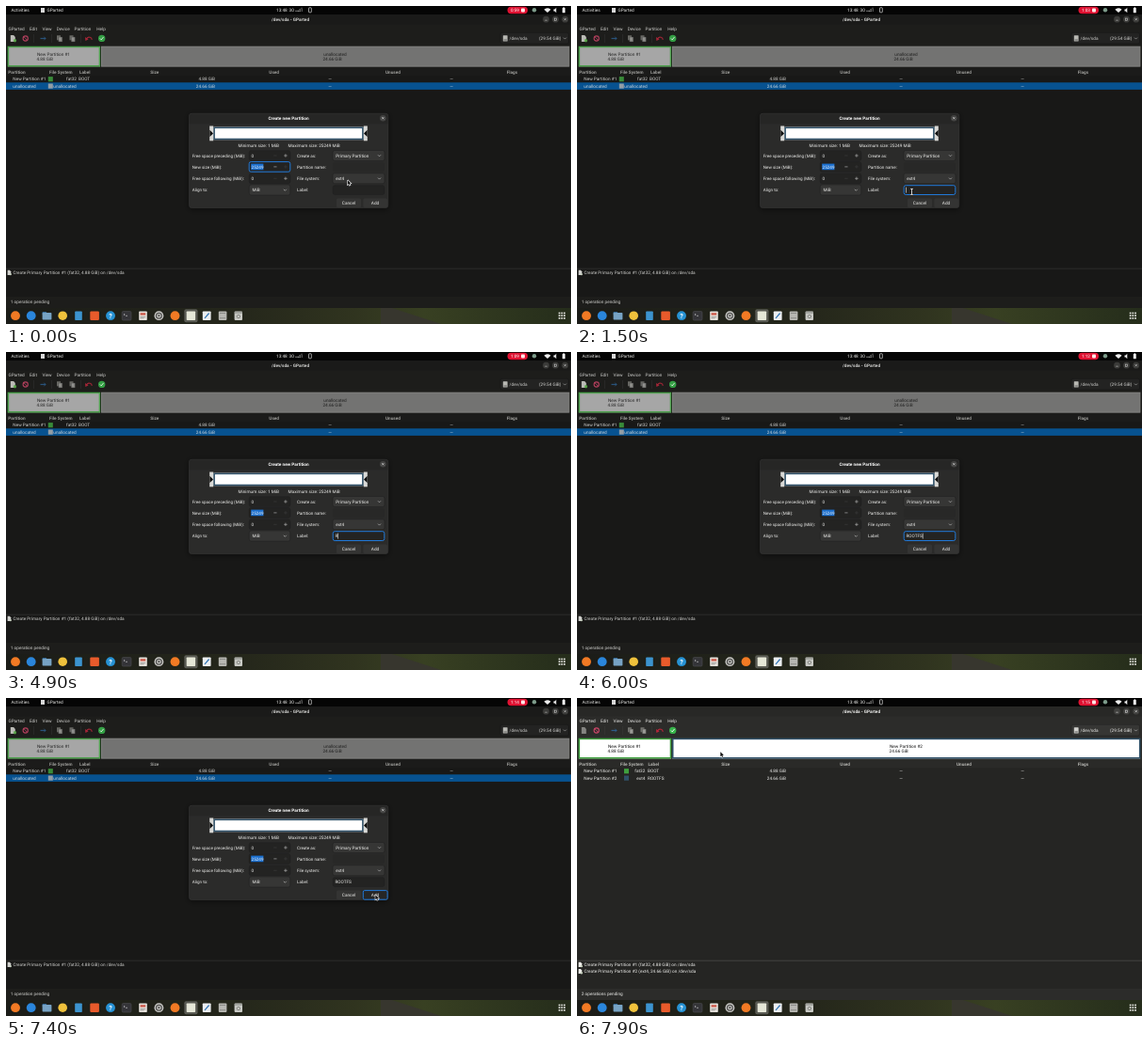
An HTML page with a canvas for the animation above (8 s loop, 600 px wide and 338 px high).

```html
<!DOCTYPE html>
<html lang="en">
<head>
<meta charset="utf-8">
<title>Partition editor</title>
<style>
html, body { margin: 0; width: 100%; height: 100%; overflow: hidden; background: #000; }
canvas { display: block; width: 600px; height: 338px; }
</style>
</head>
<body>
<canvas id="stage"></canvas>
<script>
const LOOP = 8000, W = 600, H = 338;
const stage = document.getElementById('stage');
const dpr = window.devicePixelRatio || 1;
stage.width = W * dpr;
stage.height = H * dpr;
const c = stage.getContext('2d');
const BLUE = '#2179d8', GREEN = '#3fa03f', EXT = '#2f5068', INK = '#f0f0ee';

function rect(x, y, w, h, color) {
  c.fillStyle = color;
  c.fillRect(x, y, w, h);
}
function round(x, y, w, h, r, fill, line, lw = 1) {
  c.beginPath();
  c.roundRect(x, y, w, h, r);
  if (fill) { c.fillStyle = fill; c.fill(); }
  if (line) { c.strokeStyle = line; c.lineWidth = lw; c.stroke(); }
}
function frame(x, y, w, h, color, lw) {
  c.strokeStyle = color;
  c.lineWidth = lw;
  c.strokeRect(x + lw / 2, y + lw / 2, w - lw, h - lw);
}
function disc(x, y, r, fill) {
  c.beginPath();
  c.arc(x, y, r, 0, Math.PI * 2);
  c.fillStyle = fill;
  c.fill();
}
function ring(x, y, r, color, lw) {
  c.beginPath();
  c.arc(x, y, r, 0, Math.PI * 2);
  c.strokeStyle = color;
  c.lineWidth = lw;
  c.stroke();
}
function line(pts, color, lw = 0.8) {
  c.beginPath();
  for (let i = 0; i < pts.length; i += 2) c.lineTo(pts[i], pts[i + 1]);
  c.strokeStyle = color;
  c.lineWidth = lw;
  c.stroke();
}
function poly(pts, color) {
  c.beginPath();
  for (let i = 0; i < pts.length; i += 2) c.lineTo(pts[i], pts[i + 1]);
  c.closePath();
  c.fillStyle = color;
  c.fill();
}
// y is the vertical middle of the letters
function text(s, x, y, { color = INK, align = 'left', bold = false, size = 4.7 } = {}) {
  c.font = `${bold ? 700 : 400} ${size}px Roboto, "DejaVu Sans", sans-serif`;
  c.textRendering = 'geometricPrecision';
  c.textAlign = align;
  c.textBaseline = 'alphabetic';
  c.fillStyle = color;
  c.fillText(s, x, y + size * 0.36);
}
function chevron(x, y) {
  line([x - 1.5, y - 0.7, x, y + 0.8, x + 1.5, y - 0.7], '#bbb', 0.7);
}
function cross(x, y) {
  line([x - 1.1, y - 1.1, x + 1.1, y + 1.1], '#eee', 0.6);
  line([x - 1.1, y + 1.1, x + 1.1, y - 1.1], '#eee', 0.6);
}
function sheet(x, y, w, h, color) {
  poly([x, y, x + w * 0.65, y, x + w, y + h * 0.3, x + w, y + h, x, y + h], color);
}

function topBar(t) {
  rect(0, 0, W, 9, '#050505');
  text('Activities', 5.5, 4.5);
  rect(37, 2, 4, 5, '#d8d8d8');
  text('GParted', 43.5, 4.5);
  text('13:48', 287, 4.5);
  text('30', 300.5, 4.5);
  text('أكت', 307, 4.5, { size: 4.4 });
  round(321.5, 1.8, 2.8, 5, 0.6, null, '#ddd', 0.7);
  round(532.5, 0.8, 21.5, 7.4, 3.7, '#e01232');
  const sec = t < 100 ? 59 : 60 + Math.floor(t / 500);
  const clock = Math.floor(sec / 60) + ':' + String(sec % 60).padStart(2, '0');
  text(clock, 536, 4.5, { color: '#fff', size: 4.6 });
  round(547, 2.4, 4, 4, 0.8, '#ffe6e6');
  disc(561, 4.3, 2.2, '#7d9c8b');
  c.beginPath();
  c.moveTo(575, 7);
  c.arc(575, 7, 4.8, -Math.PI * 0.77, -Math.PI * 0.23);
  c.fillStyle = '#eee';
  c.fill();
  poly([581.5, 3.4, 582.7, 3.4, 584.3, 1.8, 584.3, 7.2, 582.7, 5.6, 581.5, 5.6], '#eee');
  round(590.8, 2, 3, 5.3, 0.5, '#eee');
  rect(591.7, 1.2, 1.2, 1, '#eee');
}

function toolbar(done) {
  const dim = '#777773';
  sheet(4.8, 31, 5, 7, done ? '#858582' : '#d6d6d2');
  if (!done) disc(9.5, 36.7, 1.7, '#55a843');
  ring(20.7, 34.5, 2.6, '#cb4668', 1.1);
  line([18.9, 32.7, 22.5, 36.3], '#cb4668', 0.9);
  line([36.5, 34.5, 42, 34.5], '#2d5d8b', 1.2);
  line([40.3, 32.7, 42.1, 34.5, 40.3, 36.3], '#2d5d8b', 0.9);
  for (const x of [54, 67.5]) {
    rect(x, 31.3, 4, 5, dim);
    round(x + 1.8, 33, 4, 5, 0.3, '#9a9a96', '#3a3a38', 0.5);
  }
  for (const x of [29.5, 48.5, 79.5]) rect(x, 30, 0.5, 9, '#3a3a38');
  c.beginPath();
  c.arc(88.3, 36.2, 3, -Math.PI * 0.9, -0.1);
  c.strokeStyle = '#b5263a';
  c.lineWidth = 1.1;
  c.stroke();
  poly([84, 33, 84.3, 37, 87.6, 35.5], '#b5263a');
  disc(101.7, 34.4, 3.7, '#37b34a');
  line([99.9, 34.5, 101.2, 35.9, 103.6, 32.9], '#fff', 0.9);
  round(527.8, 31.2, 4.8, 6.4, 0.6, '#d0d0cc');
  rect(528.6, 35.5, 3.2, 1, '#555');
  text('/dev/sda', 534.6, 34.4);
  text('(29.54 GiB)', 566, 34.4);
  chevron(593.5, 34.3);
}

// flat areas, which darken while the dialog is open
function surfaces(done, shade) {
  rect(0, 9, W, 312, '#2c2c2a');
  rect(0, 9, W, 10.5, '#282826');
  round(525, 28.3, 72.5, 11.7, 2, '#363634', '#1f1f1e', 0.5);
  rect(2, 43, 98, 21.4, '#fff');
  rect(101, 43, 497, 21.4, done ? '#fff' : '#b0b0ae');
  rect(0, 66, W, 213, '#252523');
  rect(0, 66, W, 8.2, '#2a2a28');
  if (!done) rect(0, 81.3, W, 7.6, '#0a7edc');
  rect(0, 278.5, W, 1.5, '#393937');
  rect(0, 280, W, 29, '#252523');
  if (shade > 0) rect(0, 9, W, 312, `rgba(0,0,0,${shade})`);
}

function diskBar(done) {
  frame(1.6, 42.7, 98.6, 21.8, GREEN, 1.5);
  frame(101, 42.7, 497.4, 21.8, done ? EXT : '#898987', done ? 1.5 : 0.8);
  const mid = { color: '#111', align: 'center' };
  text('New Partition #1', 50.5, 51, mid);
  text('4.88 GiB', 41.2, 56.4, mid);
  text(done ? 'New Partition #2' : 'unallocated', 349.5, 51, mid);
  text('24.66 GiB', done ? 341.7 : 346.5, 56.4, mid);
}

function row(y, name, color, fs, label, size, done) {
  text(name, 7.3, y);
  rect(done ? 50 : 44.8, y - 2.6, 5, 5.2, color);
  if (fs === 'unallocated') text(fs, 50.3, y);
  else text(fs, done ? 72.3 : 75, y, { align: 'right' });
  text(label, done ? 75 : 77, y);
  text(size, 222, y, { align: 'right' });
  text('—', 344, y, { align: 'center' });
  text('—', 473, y, { align: 'center' });
}

function operation(y, n, fs, size) {
  sheet(1.6, y - 2.7, 3.6, 5.2, '#f0f0ec');
  disc(4.8, y + 1.6, 1.2, '#c5cfbd');
  text(`Create Primary Partition #${n} (${fs}, ${size} GiB) on /dev/sda`, 7.5, y);
}

function mainWindow(done, shade) {
  surfaces(done, shade);
  c.globalAlpha = 1 - shade * 0.4;
  text('/dev/sda - GParted', 302, 14.3, { bold: true, align: 'center' });
  for (const x of [573.5, 583.5, 593.7]) disc(x, 14.2, 3.4, '#41413f');
  line([572.3, 15.2, 574.7, 15.2], '#ddd', 0.6);
  frame(582.1, 12.8, 2.8, 2.8, '#ddd', 0.6);
  cross(593.7, 14.2);
  const menu = { GParted: 2.5, Edit: 25, View: 38.5, Device: 53.8, Partition: 72.5, Help: 96.2 };
  for (const s in menu) text(s, menu[s], 24);
  toolbar(done);
  diskBar(done);

  const heads = { Partition: 2.3, 'File System': 46, Label: done ? 75.5 : 78, Size: 153.3, Used: 279.3, Unused: 403, Flags: 531.7 };
  for (const s in heads) text(s, heads[s], 70.2, { bold: true, color: '#b5b5b1' });
  row(77.7, 'New Partition #1', GREEN, 'fat32', 'BOOT', '4.88 GiB', done);
  if (done) row(85.1, 'New Partition #2', EXT, 'ext4', 'ROOTFS', '24.66 GiB', done);
  else row(85.1, 'unallocated', '#a9a9a9', 'unallocated', '', '24.66 GiB', done);

  operation(283.5, 1, 'fat32', '4.88');
  if (done) operation(290.6, 2, 'ext4', '24.66');
  text(done ? '2 operations pending' : '1 operation pending', 4.8, 314.8);
  c.globalAlpha = 1;
}

function dock() {
  const g = c.createLinearGradient(0, 0, W, 0);
  g.addColorStop(0, '#1b1c18');
  g.addColorStop(0.42, '#25271b');
  g.addColorStop(0.62, '#30341f');
  g.addColorStop(0.74, '#384022');
  g.addColorStop(1, '#252d1b');
  rect(0, 321, W, 17, g);
  poly([398, 321, 410, 321, 462, 338, 398, 338], '#37362e');
  const y = 329.2;
  disc(10, y, 4.9, '#f27a24');
  disc(26.7, y, 4.9, '#2a86dc');
  round(38.6, 325, 4.5, 3, 0.7, '#3a6e9d');
  round(38.6, 326, 9.8, 7.5, 0.8, '#77a3c4');
  disc(60.2, y, 4.8, '#f0c23c');
  round(73.2, 324.4, 7.6, 9.6, 0.8, '#3c94cf');
  round(89.3, 324.5, 9.6, 9.4, 1.2, '#e95b2b');
  disc(111, y, 4.9, '#2793d5');
  text('?', 111, y, { align: 'center', bold: true, size: 7, color: '#fff' });
  round(123.2, 324.6, 9.8, 9.4, 1.2, '#343438', '#55555a', 0.5);
  line([125, 327, 126.2, 328, 125, 329], '#ddd', 0.6);
  line([127, 329.3, 129, 329.3], '#ddd', 0.6);
  round(141.2, 324.4, 8.6, 9.6, 0.8, '#e6e2dc');
  rect(142.6, 326.2, 5.6, 2.4, '#cd5b4b');
  rect(142.6, 330, 5.6, 0.7, '#888');
  rect(142.6, 331.6, 4, 0.7, '#888');
  disc(162.4, y, 4.9, '#c9c9c5');
  ring(162.4, y, 2.9, '#50504e', 1.2);
  disc(162.4, y, 1.1, '#50504e');
  disc(179.5, y, 4.9, '#f27a24');
  round(189.3, 322.2, 14.2, 14, 2, 'rgba(255,255,255,.25)');
  round(191.7, 324.4, 9.4, 9.6, 0.8, '#e5e7d7');
  round(208.8, 324.4, 8.8, 9.6, 0.8, '#eceff1');
  line([211, 331.8, 215.6, 326.5], '#3376b5', 1.2);
  round(225.8, 324.4, 8.6, 9.6, 1, '#b7b7b2');
  rect(227, 326, 6, 1, '#8d8d89');
  rect(227, 331.2, 6, 1, '#8d8d89');
  round(242.6, 324.4, 8.4, 9.6, 1, '#c9cac5');
  rect(242.6, 325.6, 8.4, 0.8, '#6f706c');
  ring(246.8, 330, 1.7, '#73746f', 0.8);
  for (let i = 0; i < 9; i++) rect(586.8 + (i % 3) * 2.7, 325.6 + Math.floor(i / 3) * 2.7, 1.7, 1.7, '#e8e8e4');
}

function combo(x, y, w, s) {
  round(x, y, w, 11, 2, '#363635', '#1f1f1e', 0.5);
  text(s, x + 3.2, y + 5.5);
  chevron(x + w - 5.5, y + 5.5);
}
function spin(y, value, { selected, focus, minus, plus }) {
  round(258.2, y, 43.6, 10.6, 2, '#232322', focus ? BLUE : '#1f1f1e', focus ? 1 : 0.5);
  if (selected) rect(260.2, y + 2, 13.2, 6.6, '#1a6fd0');
  text(value, 260.6, y + 5.3, { size: 4.6 });
  line([284.3, y + 5.3, 287.5, y + 5.3], minus ? '#aaa' : '#3c3c3b', 0.7);
  const k = plus ? '#aaa' : '#3c3c3b';
  line([295.2, y + 5.3, 298.6, y + 5.3], k, 0.7);
  line([296.9, y + 3.6, 296.9, y + 7], k, 0.7);
}

const typing = [[3500, 'R'], [5200, 'RO'], [5500, 'ROO'], [5700, 'ROOT'], [5900, 'ROOTF'], [6000, 'ROOTFS']];
const blinks = [2100, 2700, 3300, 4200, 5000, 6800];

function dialog(t) {
  const inLabel = t >= 1250 && t < 7300, onAdd = t >= 7300;
  c.save();
  c.shadowColor = 'rgba(0,0,0,.5)';
  c.shadowBlur = 6 * dpr;
  c.shadowOffsetY = 1.5 * dpr;
  round(194.3, 114, 211.7, 100.8, 3, '#2b2b2a');
  c.restore();
  round(194.5, 114.2, 211.3, 100.4, 3, null, '#393938', 0.5);
  round(194.8, 114.4, 210.7, 10.8, [3, 3, 0, 0], '#262625');
  text('Create new Partition', 300, 119.5, { bold: true, align: 'center', color: '#fff' });
  disc(400.3, 119.2, 3.3, '#444443');
  cross(400.3, 119.2);

  rect(216.2, 127.5, 4, 15.8, '#d9d9d6');
  rect(379.8, 127.5, 4, 15.8, '#d9d9d6');
  poly([216.4, 131.8, 220, 135.4, 216.4, 139], '#0a0a0a');
  poly([383.6, 131.8, 380, 135.4, 383.6, 139], '#0a0a0a');
  rect(220.4, 128.6, 159.2, 13.6, '#fff');
  frame(220.4, 128.6, 159.2, 13.6, EXT, 1.5);
  text('Minimum size: 1 MiB', 246.5, 148);
  text('Maximum size: 25249 MiB', 299.5, 148);

  const o = { size: 4.55 };
  text('Free space preceding (MiB):', 197.8, 159, o);
  text('New size (MiB):', 197.8, 171, o);
  text('Free space following (MiB):', 197.8, 183.3, o);
  text('Align to:', 197.8, 195.4, o);
  text('Create as:', 309, 159, o);
  text('Partition name:', 309, 171, o);
  text('File system:', 309, 183.3, o);
  text('Label:', 309, 195.4, o);
  spin(153.7, '0', { plus: true });
  spin(165.6, '25249', { selected: true, focus: !inLabel && !onAdd, minus: true });
  spin(178, '0', { plus: true });
  combo(258.2, 190, 43.6, 'MiB');
  combo(347, 153.5, 55, 'Primary Partition');
  round(347.2, 165.8, 54.6, 10.4, 2, '#282827');
  combo(347, 177.8, 55, 'ext4');

  round(347.2, 190.7, 54.6, 9.8, 2, '#232322', inLabel ? BLUE : '#1f1f1e', inLabel ? 1 : 0.5);
  let label = '';
  for (const [at, s] of typing) if (t >= at) label = s;
  text(label, 349.4, 195.6);
  if (inLabel && !blinks.some(b => t >= b && t < b + 200)) {
    rect(349.4 + c.measureText(label).width, 192.6, 0.6, 6, '#f4f4f4');
  }

  round(351, 204.6, 26, 9.6, 1.5, '#343433');
  round(379.3, 204.6, 25.8, 9.6, 1.5, onAdd ? '#262625' : '#343433', onAdd ? BLUE : null);
  text('Cancel', 364, 209.2, { align: 'center' });
  text('Add', 392, 209.2, { align: 'center' });
}

// time, x, y of the pointer tip
const path = [[0, 362.8, 185], [400, 362.8, 185], [1200, 355.5, 197.4], [6400, 355.5, 197.4],
  [6800, 392.3, 209.2], [7450, 392.3, 209.2], [7900, 152.3, 57.2], [8000, 152.3, 57.2]];

function pointer(t) {
  if (t >= 3500 && t < 6400) return;
  const i = path.findIndex(p => t < p[0]);
  const [t0, x0, y0] = path[i - 1], [t1, x1, y1] = path[i];
  const u = (t - t0) / (t1 - t0), e = u * u * (3 - 2 * u);
  const x = x0 + (x1 - x0) * e, y = y0 + (y1 - y0) * e;
  if (t < 7450 && x > 347 && x < 402 && y > 190.5 && y < 200.6) {
    for (const [color, w] of [['#111', 1.8], ['#fff', 0.8]]) {
      line([x - 1.4, y - 3, x + 1.4, y - 3], color, w);
      line([x, y - 3, x, y + 3], color, w);
      line([x - 1.4, y + 3, x + 1.4, y + 3], color, w);
    }
    return;
  }
  c.save();
  c.translate(x, y);
  const arrow = [0, 0, 0, 5, 1.1, 4, 1.9, 5.8, 2.8, 5.4, 2, 3.7, 3.5, 3.6];
  line([...arrow, 0, 0], '#fff', 1.1);
  poly(arrow, '#111');
  c.restore();
}

function draw(t) {
  c.setTransform(dpr, 0, 0, dpr, 0, 0);
  const done = t >= 7500;
  const shade = 0.35 * Math.max(0, Math.min(1, (7700 - t) / 200));
  topBar(t);
  mainWindow(done, shade);
  dock();
  if (!done) dialog(t);
  pointer(t);
}

const start = performance.now();
function tick() {
  draw((performance.now() - start) % LOOP);
  requestAnimationFrame(tick);
}
tick();
</script>
</body>
</html>
```
